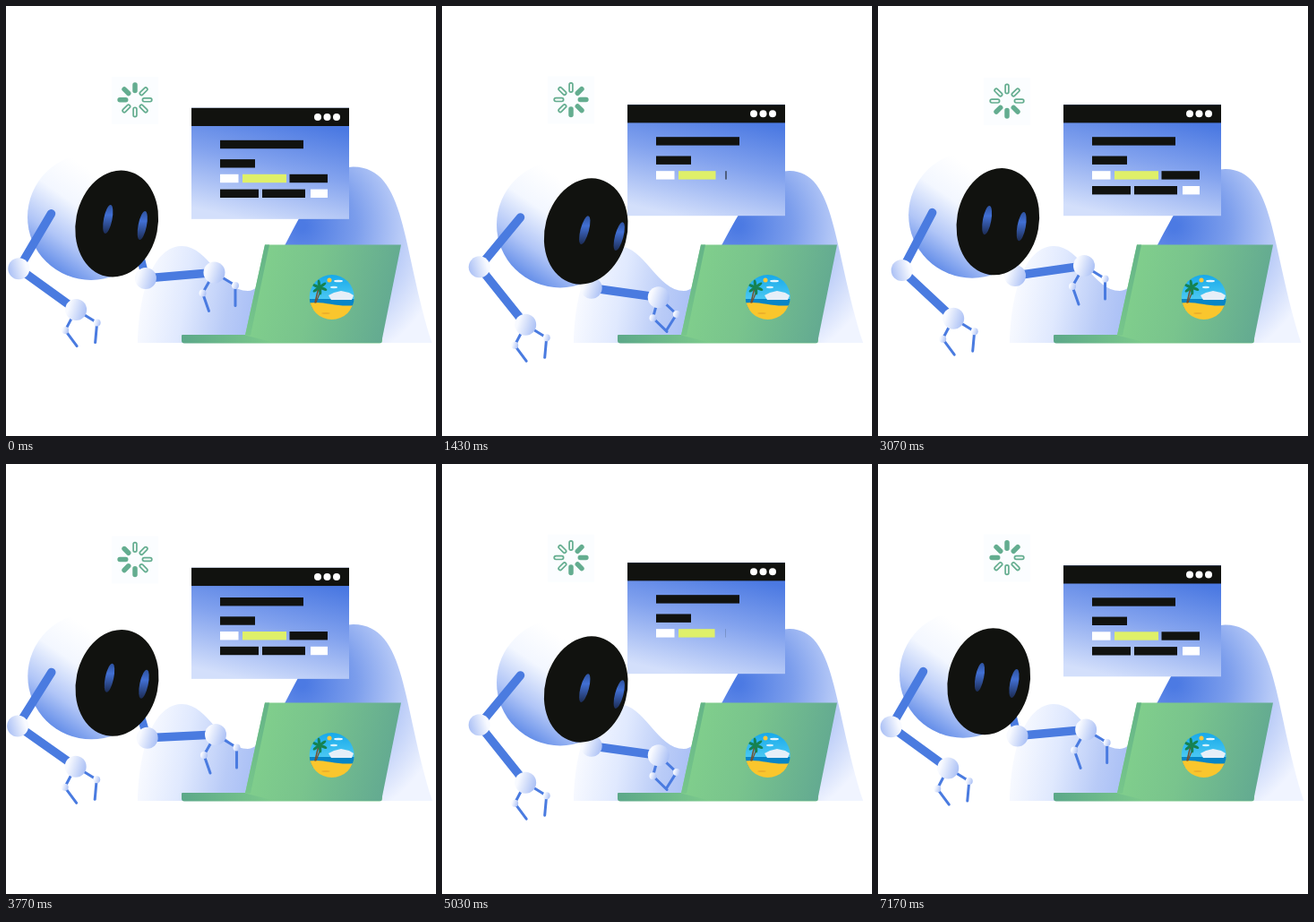
An HTML page with a canvas that plays this animation: 480x480 px, repeating every 7.21 s.

```html
<!DOCTYPE html>
<html lang="en">
<head>
<meta charset="utf-8">
<title>Robot at work</title>
<style>
html, body { margin: 0; width: 100%; height: 100%; overflow: hidden; background: #fff; }
canvas { display: block; width: 480px; height: 480px; }
</style>
</head>
<body>
<canvas id="stage" width="480" height="480"></canvas>
<script>
const ctx = document.getElementById('stage').getContext('2d');
const TAU = Math.PI * 2;
const LOOP = 7210, CYCLE = LOOP / 2, BOB = CYCLE / 2;
const BLUE = '#4a7be0', INK = '#11120f', GREEN = '#64ad90';

const clamp = u => Math.min(1, Math.max(0, u));
const mix = (a, b, u) => a + (b - a) * u;
const wave = (t, peak) => Math.cos(TAU * (t / CYCLE - peak));

function ease(t, from, to) {
  const u = clamp((t - from) / (to - from));
  return u * u * (3 - 2 * u);
}

// Four motions drive the robot: leaning in, pressing keys, dipping and swinging the free arm
function poseAt(t) {
  const lean = ease(t, 100, 1350) * (1 - ease(t, 2350, 3450));
  const press = wave(t, 0.35), dip = wave(t, 0.58), swing = wave(t, 0.76);
  return {
    curl: Math.max(0, press),
    sway: 3.5 + 3.5 * dip,
    tilt: 0.22 + 0.04 * press,
    head: [37 * lean - 0.5, 2.7 + 5.5 * press],
    eye: [3.5 + 5.5 * press, 3.5 + 4 * dip - press],
    elbow: [14 + 31 * lean + 5 * swing, 293 + 2.5 * swing],
    hand: [78 + 16.5 * lean + 2 * swing, 350.5 + 13 * dip],
    bend: [160 + 7 * press, 308 + 7 * press],
    wrist: [236 + 6 * press, 308 + 18 * press]
  };
}

function linear(x0, y0, x1, y1, ...stops) {
  const g = ctx.createLinearGradient(x0, y0, x1, y1);
  for (const [p, c] of stops) g.addColorStop(p, c);
  return g;
}

function rect(x, y, w, h, fill) {
  ctx.fillStyle = fill;
  ctx.fillRect(x, y, w, h);
}

function oval(x, y, rx, ry, fill, tilt = 0) {
  ctx.beginPath();
  ctx.ellipse(x, y, rx, ry, tilt, 0, TAU);
  ctx.fillStyle = fill;
  ctx.fill();
}

function poly(points, fill) {
  ctx.beginPath();
  for (const [x, y] of points) ctx.lineTo(x, y);
  ctx.closePath();
  ctx.fillStyle = fill;
  ctx.fill();
}

function limb([x0, y0], [x1, y1], width, color = BLUE) {
  ctx.beginPath();
  ctx.moveTo(x0, y0);
  ctx.lineTo(x1, y1);
  ctx.lineWidth = width;
  ctx.lineCap = 'round';
  ctx.strokeStyle = color;
  ctx.stroke();
}

// The shaded side faces right, or left when side is -1
function joint([x, y], r, side = 1) {
  const dx = r * side;
  oval(x, y, r, r, linear(x - dx, y - r * 0.3, x + dx, y + r * 0.3,
    [0.15, '#f8faff'], [1, '#a9bff5']));
}

function finger([x, y], kx, ky, tx, ty) {
  const knuckle = [x + kx, y + ky];
  limb([x, y], knuckle, 3);
  limb(knuckle, [x + tx, y + ty], 3);
  joint(knuckle, 4);
}

function drawHills(sway) {
  ctx.beginPath();
  ctx.moveTo(147, 376);
  ctx.bezierCurveTo(148, 330, 160, 270, 195, 268);
  ctx.bezierCurveTo(225, 266, 240, 318, 270, 318);
  ctx.bezierCurveTo(304, 318, 333, 178 + sway, 388, 179 + sway);
  ctx.bezierCurveTo(448 - sway * 1.6, 180 + sway, 442 - sway * 1.2, 270, 476 - sway * 1.2, 376);
  ctx.closePath();
  ctx.save();
  ctx.clip();
  rect(140, 170, 150, 210, linear(155, 305, 290, 330,
    [0, '#f8faff'], [0.35, '#e0e9fe'], [0.7, '#b9cbf7'], [1, '#a5bcf5']));
  const g = ctx.createRadialGradient(330, 245, 5, 330, 245, 165);
  g.addColorStop(0, '#4c7ae3');
  g.addColorStop(0.35, '#7b9dec');
  g.addColorStop(0.65, '#b6c9f7');
  g.addColorStop(1, '#f0f4ff');
  rect(285, 170, 195, 210, g);
  ctx.restore();
}

function drawSpinner(t) {
  const y = 104 + 3.5 * (1 - Math.cos(TAU * (t - 1600) / BOB));
  const lead = 7.2 - (t / (BOB / 2) * 8) % 8;
  rect(118, y - 26, 52, 53, '#fbfdff');
  for (let i = 0; i < 8; i++) {
    const d = Math.abs(i - lead) % 8;
    const near = Math.min(d, 8 - d) < 1.75;
    ctx.save();
    ctx.translate(144, y);
    ctx.rotate(i * TAU / 8);
    ctx.beginPath();
    ctx.roundRect(-1.9, -18.8, 3.8, 10.4, 1.9);
    ctx.fillStyle = near ? GREEN : '#f5faf8';
    ctx.fill();
    ctx.lineWidth = 1.7;
    ctx.strokeStyle = GREEN;
    ctx.stroke();
    ctx.restore();
  }
}

// x, y below the window top, width, colour, in typing order
const BARS = [
  [239, 36, 93, INK], [239, 57.3, 39, INK],
  [239, 74, 20.5, '#fff'], [264, 74, 49, '#dff069'], [316.5, 74, 42.5, INK],
  [239, 90.8, 43, INK], [286, 90.8, 48, INK], [340, 90.8, 19, '#fff']
];

function drawWindow(t) {
  const top = 113.8 + 3.75 * Math.sin(TAU * t / BOB);
  rect(207, top, 176, 124, linear(310, top + 10, 284, top + 128,
    [0, '#4b79e2'], [0.45, '#82a2ee'], [1, '#d3dffb']));

  const start = 585, gap = 210, typing = 255;
  const typed = t >= start;
  const lift = typed ? 0 : 90 * Math.max(0, (t - 80) / (start - 100)) ** 2;
  ctx.save();
  ctx.beginPath();
  ctx.rect(207, top + 20, 176, 104);
  ctx.clip();
  BARS.forEach(([x, y, w, color], i) => {
    const p = typed ? clamp((t - start - i * gap) / typing) : 1;
    rect(x, top + y - lift, w * p, 9.4, color);
  });
  ctx.restore();

  rect(207, top, 176, 20.2, INK);
  for (const x of [348, 358.5, 369]) oval(x, top + 10.1, 4, 4, '#fff');
}

function drawSticker() {
  ctx.save();
  ctx.beginPath();
  ctx.arc(363.7, 325, 25, 0, TAU);
  ctx.clip();
  rect(338, 299, 52, 30, linear(0, 300, 0, 328, [0, '#17a9ea'], [1, '#4cc9f3']));
  rect(338, 327, 52, 12, '#0785c7');
  oval(361, 306, 2.5, 2.5, '#ffc83a');
  oval(371, 307, 5, 1.3, '#e4f6fd');
  oval(366, 314, 4, 1.2, '#d4f1fc');
  poly([[360, 323], [366, 320], [374, 318], [383, 320], [388, 323], [386, 328], [363, 328]], '#e6eff8');
  ctx.beginPath();
  ctx.moveTo(336, 332);
  ctx.bezierCurveTo(354, 328, 368, 337, 390, 334);
  ctx.lineTo(390, 352);
  ctx.lineTo(336, 352);
  ctx.fillStyle = '#fac62d';
  ctx.fill();
  oval(357, 343, 5, 0.8, '#e9a92a');
  limb([349, 314], [345, 331], 1.5, '#76502f');
  limb([352, 316], [346, 331], 1.2, '#76502f');
  for (let i = 0; i < 6; i++) {
    const a = i * TAU / 6 + 0.4;
    oval(350 + 4.5 * Math.cos(a), 314 + 4 * Math.sin(a), 4.5, 1.6, '#168251', a);
  }
  ctx.restore();
}

function drawLaptop() {
  ctx.beginPath();
  ctx.roundRect(196, 367, 224, 9.4, [1, 0, 3, 3]);
  ctx.fillStyle = linear(196, 0, 300, 0, [0, '#5ca889'], [1, '#7dcb8c']);
  ctx.fill();
  poly([[289, 266.5], [441, 266.5], [419, 376], [300, 376], [267, 367.5]],
    linear(285, 300, 430, 335, [0, '#80ce8c'], [0.4, '#79c48d'], [1, '#63aa91']));
  poly([[289, 266.5], [294, 266.5], [273, 367.5], [267, 367.5]],
    linear(290, 267, 270, 367, [0, '#64b487'], [1, '#77c68b']));
  drawSticker();
}

function drawRightArm({ head, bend, wrist, curl }) {
  limb([148 + head[0] * 0.3, 272 + head[1]], bend, 9);
  limb(bend, wrist, 9.5);
  finger(wrist, mix(-13, -6, curl), 23, mix(-6, 10, curl), mix(43, 38, curl));
  finger(wrist, mix(23.5, 20, curl), mix(14.5, 19, curl), mix(23.5, 8, curl), 37);
  joint(bend, 12);
  joint(wrist, 12);
}

function drawHead({ head, eye, tilt }) {
  ctx.save();
  ctx.translate(...head);
  oval(95.5, 236, 71, 70.5, linear(118, 200, 52, 296,
    [0, '#ffffff'], [0.35, '#f3f7ff'], [0.7, '#b0c5f7'], [1, '#5c88e7']));
  oval(124.2, 243.5, 45.8, 60, INK, tilt);
  ctx.clip();
  for (const [x, y] of [[114, 238], [152.5, 245]]) {
    const ex = x + eye[0], ey = y + eye[1];
    oval(ex, ey, 4.7, 16.3, linear(ex, ey - 16, ex, ey + 16,
      [0, '#2e529f'], [0.35, '#4270d4'], [1, '#1c2c55']), tilt);
  }
  ctx.restore();
}

function drawLeftArm({ head, elbow, hand }) {
  limb([51 + head[0], 232 + head[1] * 0.5], elbow, 9.5);
  limb(elbow, hand, 9.5);
  finger(hand, -12, 23, 1, 40.5);
  finger(hand, 23.5, 14.5, 21.5, 36.5);
  joint(elbow, 12, -1);
  joint(hand, 12);
}

function draw(now) {
  const t = now % CYCLE;
  const pose = poseAt(t);
  rect(0, 0, 480, 480, '#fff');
  drawSpinner(t);
  drawHills(pose.sway);
  drawWindow(t);
  drawLaptop();
  drawRightArm(pose);
  drawHead(pose);
  drawLeftArm(pose);
}

const begin = performance.now();
function tick() {
  draw((performance.now() - begin) % LOOP);
  requestAnimationFrame(tick);
}
tick();
</script>
</body>
</html>
```
